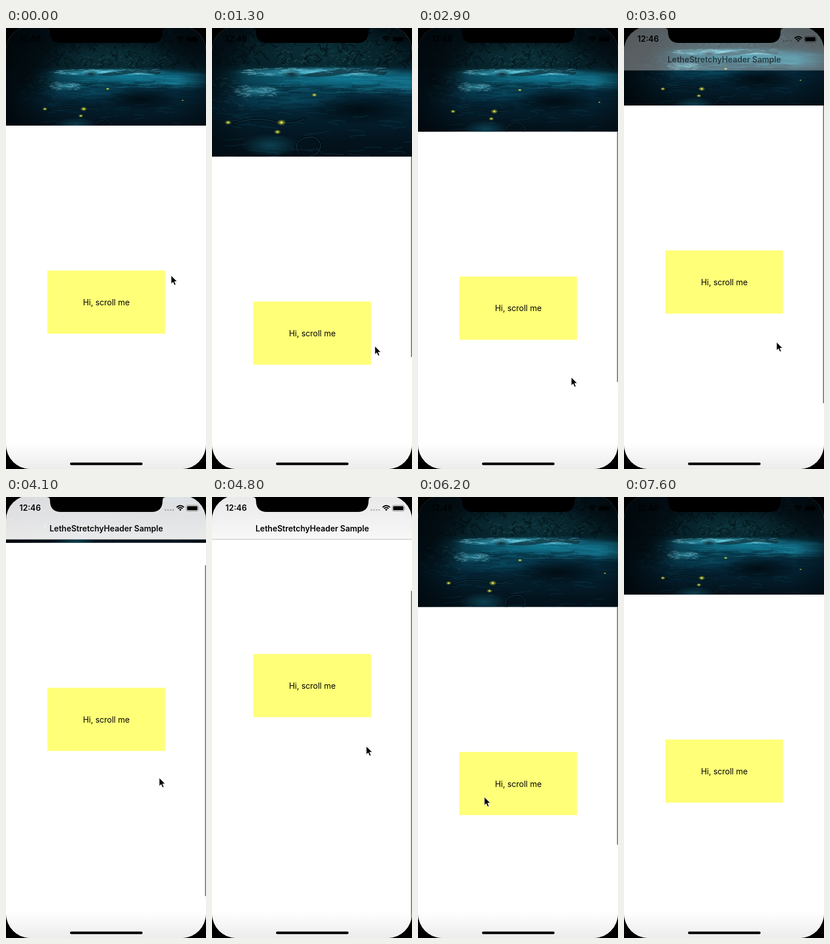
Recreate the animation shown at these times as an HTML page. Size 350 px wide and 768 px high, loop 8100 ms.

```html
<!DOCTYPE html>
<html lang="en">
<head>
<meta charset="utf-8">
<title>Stretchy header</title>
<style>
  html, body { margin: 0; width: 100%; height: 100%; overflow: hidden; background: #000; }
  svg { display: block; width: 350px; height: 768px; font: 14px Inter, "Liberation Sans", sans-serif; }
  .bold { font-weight: 600; }
  .mid { text-anchor: middle; }
</style>
</head>
<body>
<svg viewBox="0 0 350 768">
  <defs>
    <clipPath id="screen"><rect y="-3" width="350" height="771" rx="43"/></clipPath>
    <clipPath id="header"><rect id="headerBox" width="350" height="170"/></clipPath>
    <linearGradient id="foot" x2="0" y2="1"><stop stop-color="#fff"/><stop offset="1" stop-color="#ececec"/></linearGradient>
    <linearGradient id="bar" x2="0" y2="1"><stop stop-color="#e9e9eb"/><stop offset="1" stop-color="#f8f8f8"/></linearGradient>
    <linearGradient id="night" x2="0" y2="1">
      <stop stop-color="#020e14"/><stop offset=".36" stop-color="#051d25"/>
      <stop offset=".43" stop-color="#07394a"/><stop offset=".6" stop-color="#04283a"/>
      <stop offset=".85" stop-color="#03131d"/><stop offset="1" stop-color="#020d15"/>
    </linearGradient>
    <linearGradient id="sides">
      <stop stop-color="#01070b" stop-opacity=".95"/><stop offset=".27" stop-color="#01070b" stop-opacity="0"/>
      <stop offset=".85" stop-color="#01070b" stop-opacity="0"/><stop offset="1" stop-color="#01070b" stop-opacity=".45"/>
    </linearGradient>
  </defs>

  <g clip-path="url(#screen)">
    <rect width="350" height="768" fill="#fff"/>
    <rect y="722" width="350" height="46" fill="url(#foot)"/>
    <g clip-path="url(#header)"><g id="scene"></g></g>
    <g id="content">
      <rect x="72.3" y="252.4" width="206" height="110" fill="#ffff78"/>
      <text class="mid" x="175.5" y="313">Hi, scroll me</text>
    </g>
    <rect id="thumb" x="348.2" width="1.8" fill="#7a7a7a"/>
    <g id="nav">
      <rect width="350" height="74" fill="url(#bar)"/>
      <rect y="73.3" width="350" height=".9" fill="#b4b4b4"/>
    </g>
    <text id="title" class="bold mid" x="175.5" y="60">LetheStretchyHeader Sample</text>
    <text class="bold" x="23.5" y="24">12:46</text>
    <path d="M279 22.5h14" stroke="#000" stroke-opacity=".25" stroke-width="3" stroke-linecap="round" stroke-dasharray="0 4.5"/>
    <path d="M298.5 18Q305 12 311.5 18M301 20.3Q305 16.8 309 20.3" fill="none" stroke="#000" stroke-width="2"/>
    <path d="M302.8 21.8Q305 20 307.2 21.8L305 24.3Z"/>
    <rect x="315.5" y="14.5" width="21" height="10" rx="2.8" fill="none" stroke="#000" stroke-opacity=".4"/>
    <rect x="317" y="16" width="18" height="7" rx="1.5"/>
    <path d="M337.7 18v3q1.5-1.5 0-3" opacity=".4"/>
    <rect x="112" y="756.8" width="127" height="4.4" rx="2.2"/>
  </g>
  <path d="M71 0Q77 0 77 6Q77 26 96 26H255Q274 26 274 6Q274 0 280 0Z"/>
  <path id="cursor" d="M0 0V14.5L3.3 11.5L5.8 17L8.2 16L5.900 10.600H10.500Z" stroke="#fff" stroke-width=".8"/>
</svg>

<script>
const $ = id => document.getElementById(id);
const set = (id, attrs) => Object.entries(attrs).forEach(([k, v]) => $(id).setAttribute(k, v));
const clamp = v => Math.max(0, Math.min(1, v));
const LOOP = 8100, REST = 170;

// Turning points of the gesture: time, header height, pointer x, pointer y
const keys = [
  [0, REST, 289, 431], [500, REST, 289, 431], [1300, 224, 285, 554], [2200, 271, 270, 654],
  [3000, REST, 268, 600], [3600, 135, 267, 547], [4800, 21, 270, 434], [5400, 182, 235, 619],
  [5800, 207, 224, 728], [6700, REST, -20, 235], [LOOP, REST, -20, 235]
];

let seed = 7;
const rand = (a, b) => {
  seed = (seed * 16807) % 2147483647;
  return a + (b - a) * seed / 2147483647;
};

const line = (d, color, width, opacity) =>
  `<path d="${d}" fill="none" stroke="${color}" stroke-width="${width}" stroke-opacity="${opacity}" stroke-linecap="round"/>`;

// Scattered short curved strokes inside a box
function strokes(n, x0, x1, y0, y1, dx, dy, color, width, opacity) {
  let d = "";
  for (let i = 0; i < n; i++) {
    const w = rand(dx / 3, dx);
    d += `M${rand(x0, x1)} ${rand(y0, y1)}q${w / 2} ${rand(-dy, dy)} ${w} ${rand(-dy, dy)}`;
  }
  return line(d, color, width, opacity);
}

// Soft ellipse fading outwards
let blobs = 0;
function blob(x, y, rx, ry, color, opacity = 1) {
  const id = "blob" + blobs++;
  return `<radialGradient id="${id}"><stop stop-color="${color}" stop-opacity="${opacity}"/>`
    + `<stop offset="1" stop-color="${color}" stop-opacity="0"/></radialGradient>`
    + `<ellipse cx="${x}" cy="${y}" rx="${rx}" ry="${ry}" fill="url(#${id})"/>`;
}
const firefly = (x, y, r) => blob(x, y, r * 1.5, r, "#c4cc30") + blob(x, y, r / 2, r / 2, "#f4f880");

function riverScene() {
  const dark = "#01090e", teal = "#12809c", foam = "#8fd8e6";
  const log = "M160 81q40-8 70-9q28-8 41 4q0 5-8 5q-25-6-50-1t-53 2z";
  const roots = "M75 143q25-10 48-4t42-2M158 180q-8-14 8-19t20 8q0 12-14 15";
  const forest = blob(185, 50, 120, 32, "#14525c", .4)
    + strokes(240, 30, 320, 0, 68, 7, 7, "#2a6f7a", .5, .3)
    + strokes(150, 20, 330, 0, 70, 10, 10, dark, 1.5, .6)
    + strokes(70, 130, 280, 50, 70, 5, 3, "#3d8580", .7, .4)
    + blob(320, 15, 70, 55, dark, .9) + blob(40, 20, 90, 60, dark, .8);
  const water = blob(215, 86, 150, 17, teal, .9)
    + blob(312, 92, 62, 17, "#16809c", .75)
    + blob(145, 112, 85, 16, teal, .35)
    + strokes(80, 100, 325, 80, 104, 40, 1, "#29a1bd", 1, .25)
    + strokes(70, 90, 310, 93, 140, 40, 2, "#021a27", 2, .3)
    + blob(235, 125, 70, 20, dark, .85)
    + blob(122, 170, 38, 15, "#115468", .7)
    + strokes(45, 50, 300, 125, 188, 30, 3, "#11617a", 1.2, .22);
  const rapids = blob(180, 77, 112, 7, "#3db4cd", .95)
    + strokes(80, 80, 262, 72, 81, 14, 1, foam, .8, .5)
    + `<path d="${log}" fill="#0b3340" fill-opacity=".8"/>`
    + blob(149, 80, 14, 6, "#0a2a36")
    + strokes(25, 138, 270, 72, 78, 9, 1, "#69b8c8", .7, .5);
  const bank = blob(35, 85, 55, 42, dark, .9)
    + blob(104, 101, 34, 8, "#3899ae", .65)
    + strokes(45, 76, 126, 94, 108, 8, 2, foam, .8, .4)
    + strokes(45, 25, 90, 85, 125, 9, 4, "#2b6e80", .7, .45);
  return '<rect y="-5" width="350" height="200" fill="url(#night)"/>'
    + forest + water + bank + rapids
    + line(roots, dark, 4, .5) + line(roots, "#2a6577", 1, .4)
    + '<rect y="-5" width="350" height="200" fill="url(#sides)"/>'
    + firefly(68, 141, 3) + firefly(136, 141, 4) + firefly(131, 153, 3)
    + firefly(178, 106, 2.5) + firefly(309, 126, 1.5);
}

// Smooth curve through the keys that never overshoots them
function pose(t) {
  const i = keys.findIndex(k => k[0] > t), a = keys[i - 1], b = keys[i];
  const span = b[0] - a[0], p = (t - a[0]) / span;
  const slope = (j, n) => keys[j] && keys[j - 1] ? (keys[j][n] - keys[j - 1][n]) / (keys[j][0] - keys[j - 1][0]) : 0;
  const tangent = (j, n) => {
    const u = slope(j, n), v = slope(j + 1, n);
    return u * v > 0 ? 2 * u * v / (u + v) : 0;
  };
  return a.map((v, n) => v + (b[n] - v) * p * p * (3 - 2 * p)
    + span * p * (1 - p) * (tangent(i - 1, n) * (1 - p) - tangent(i, n) * p));
}

function draw(t) {
  const [, h, x, y] = pose(t), d = h - REST;
  const pull = Math.max(0, d), zoom = 1 + .0058 * pull + .00002 * pull * pull;
  const cy = 106 + (d > 0 ? .195 * d : d);
  set("headerBox", { height: h });
  set("scene", { transform: `translate(${178 + .02 * pull} ${cy}) scale(${zoom}) translate(-178 -106)` });
  set("content", { transform: `translate(0 ${h})` });

  const end = 627 - d * (d > 0 ? 1 : .755), top = Math.max(h, end - 576);
  set("thumb", { y: top, height: end - top, opacity: clamp(Math.min((t - 400) / 200, (7000 - t) / 300)) });

  const alpha = clamp(-d / 96);
  set("nav", { opacity: alpha });
  set("title", { opacity: Math.sqrt(alpha) });
  set("cursor", { transform: `translate(${x} ${y})` });
}

$("scene").innerHTML = riverScene();
const start = performance.now();
function tick() {
  const t = (performance.now() - start) % LOOP;
  draw(Math.floor(t / 100) * 100);
  requestAnimationFrame(tick);
}
tick();
</script>
</body>
</html>
```
